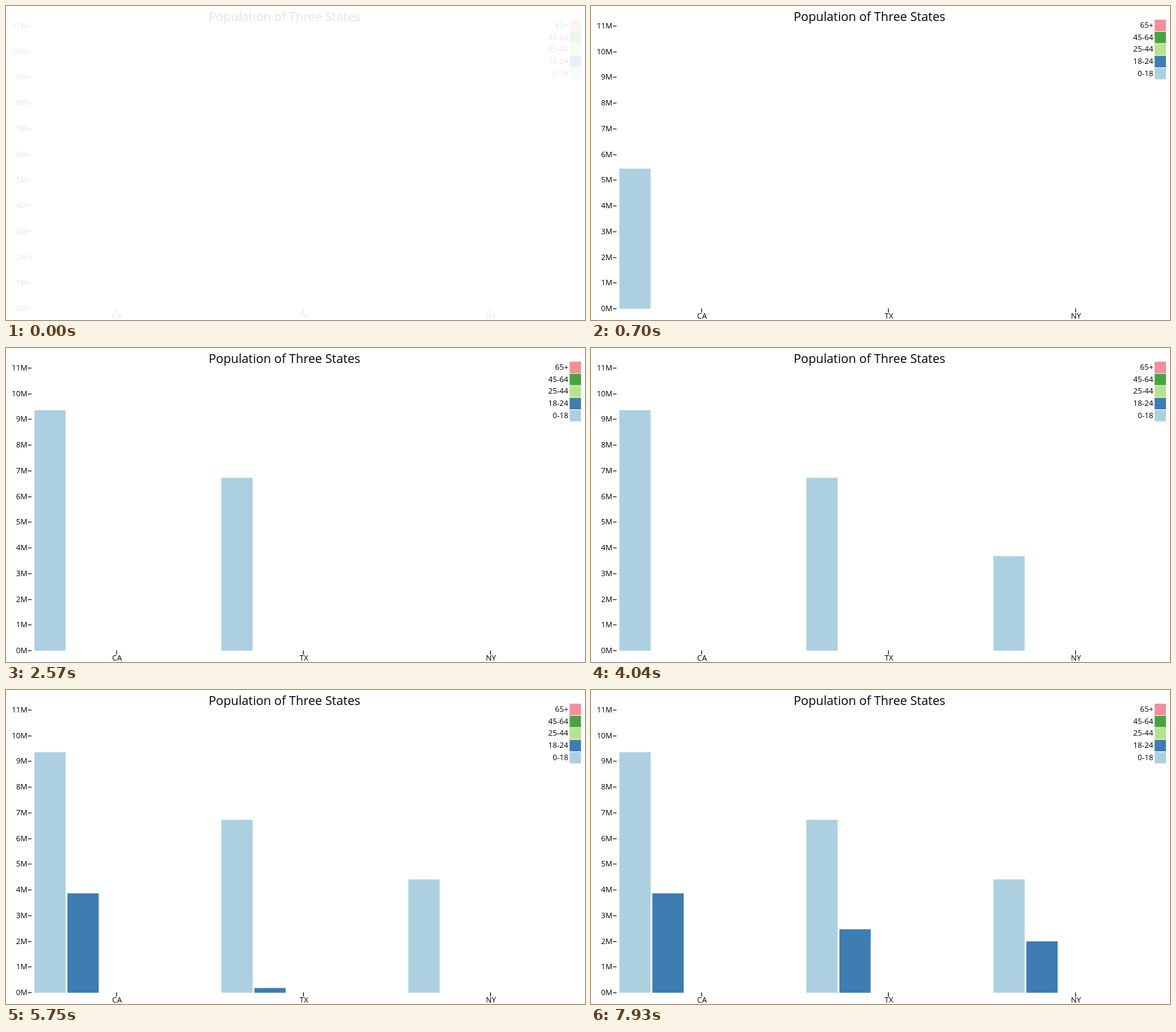
Animation, 850 px wide and 461 px high, one loop 8000 ms. Source, as an HTML page with a canvas:

```html
<!DOCTYPE html>
<html lang="en">
<head>
<meta charset="utf-8">
<title>Population of Three States</title>
<style>
  html, body { margin: 0; overflow: hidden; background: #fff; }
  canvas { display: block; }
</style>
</head>
<body>
<canvas id="stage" width="850" height="461"></canvas>
<script>
const ctx = document.getElementById('stage').getContext('2d');
const LOOP = 8000, GROW = 575;
const BASE = 444.5, UNIT = 37.73;      // y of 0M, pixels per million
const LEFT = 41.6, GROUP = 274.5;      // first bar, distance between states

const states = ['CA', 'TX', 'NY'];
const ages = [
  ['65+', '#f28f9b'], ['45-64', '#4aa341'], ['25-44', '#b7e28f'],
  ['18-24', '#3d7db1'], ['0-18', '#acd0e0'],
];
const bars = [
  { series: 0, state: 0, value: 9.36, start: 365 },
  { series: 0, state: 1, value: 6.73, start: 1947 },
  { series: 0, state: 2, value: 4.41, start: 3560 },
  { series: 1, state: 0, value: 3.87, start: 4124 },
  { series: 1, state: 1, value: 2.47, start: 5707 },
  { series: 1, state: 2, value: 2.00, start: 7294 },
];
// Moving phases: first step, last step, number of steps
const phases = [
  [150, 940, 11], [2040, 2570, 8], [3580, 4360, 11],
  [4440, 4750, 5], [5750, 6290, 8], [7380, 7930, 8],
];

const clamp = x => Math.min(1, Math.max(0, x));

// Time of the latest step shown at t
function lastStep(t) {
  let shown = 0;
  for (const [from, to, count] of phases)
    for (let i = 0; i < count; i++) {
      const step = Math.floor((from + (to - from) * i / (count - 1)) / 10) * 10;
      if (step <= t) shown = step;
    }
  return shown;
}

function text(str, x, y, align, size = 11.3) {
  ctx.font = `${size}px "Open Sans", "Noto Sans", sans-serif`;
  ctx.textAlign = align;
  ctx.fillText(str, x, y);
}

function drawFrame() {
  ctx.fillStyle = '#000';
  text('Population of Three States', 408.8, 22, 'center', 18.1);
  for (let m = 0; m <= 11; m++) {
    const y = Math.floor(BASE - m * UNIT);
    text(m + 'M', 31.5, y + 4, 'right');
    ctx.fillRect(32.3, y, 5.2, 1);
  }
  states.forEach((name, i) => {
    const x = 162 + i * GROUP;
    text(name, x + 1, 459, 'center');
    ctx.fillRect(Math.floor(x), 444, 1, 6);
  });
  ages.forEach(([label, color], i) => {
    const y = 20.1 + i * 17.7;
    ctx.fillStyle = '#000';
    text(label, 825.5, Math.floor(y + 8.3) + 4, 'right');
    ctx.fillStyle = color;
    ctx.fillRect(827.4, y, 16.7, 16.8);
  });
}

function draw(now) {
  const t = lastStep(now % LOOP);
  ctx.globalAlpha = 1;
  ctx.fillStyle = '#fff';
  ctx.fillRect(0, 0, 850, 461);

  ctx.globalAlpha = clamp(0.11 + 0.89 * t / 365);
  drawFrame();

  ctx.globalAlpha = 1;
  for (const { series, state, value, start } of bars) {
    const height = value * UNIT * clamp((t - start) / GROW);
    ctx.fillStyle = ages[4 - series][1];
    ctx.fillRect(LEFT + state * GROUP + series * 48.5, BASE - height, 46, height);
  }
  requestAnimationFrame(draw);
}
requestAnimationFrame(draw);
</script>
</body>
</html>
```
